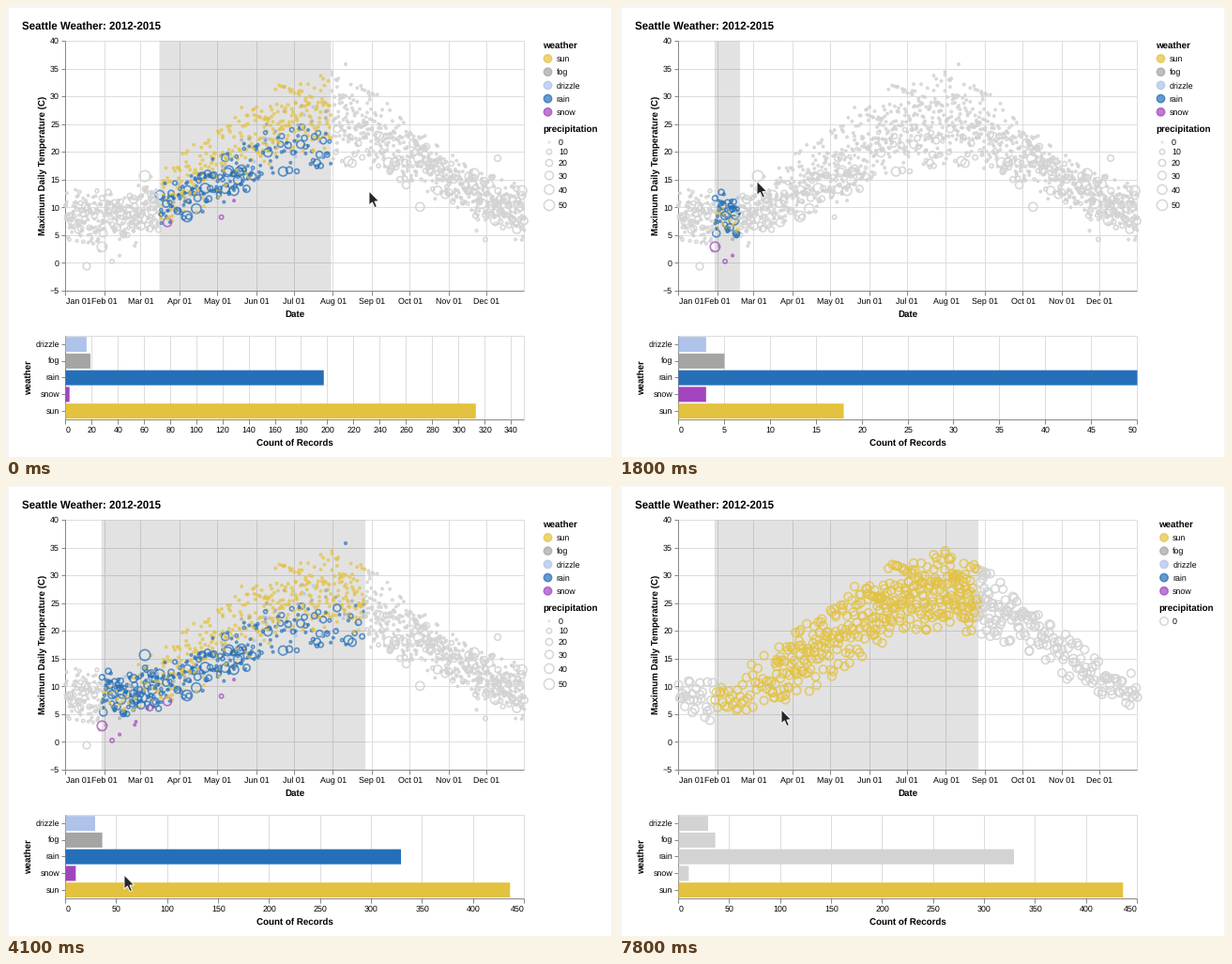
These frames come from a looping animation (647 by 480 pixels, 8000 ms). A matplotlib script:

```python
import math
import numpy as np
import matplotlib.pyplot as plt
from matplotlib.animation import FuncAnimation
from matplotlib.colors import to_rgba
from matplotlib.patches import Circle, Polygon, Rectangle

W, H, DPI = 647, 480, 100
PT = 72 / DPI                       # points per pixel
LEFT, RIGHT = 63.5, 552.5
TOP, BOTTOM = 37.5, 303.5           # scatter plot
BAR_TOP, BAR_BOTTOM = 351.5, 440.5  # bar chart
DAY = (RIGHT - LEFT) / 365
SMALL, MEDIUM, LARGE = 8.87, 9.76, 11.53
GREY, GRID, AXIS = "#d3d3d3", "#dddddd", "#888888"
STEP_MS, LOOP_MS = 100, 8000

plt.rcParams["font.family"] = "Liberation Sans"
plt.rcParams["text.hinting"] = "no_hinting"
fig = plt.figure(figsize=(W / DPI, H / DPI), dpi=DPI, facecolor="#f5f5f5")
ax = fig.add_axes([0, 0, 1, 1])
ax.set_xlim(0, W)
ax.set_ylim(H, 0)
ax.axis("off")


# ---------- weather records ----------

COLORS = dict(sun="#e3c240", fog="#a5a5a4", drizzle="#aec2ea",
              rain="#256fb8", snow="#a244be")
KINDS = list(COLORS)

# mean temperature, seasonal swing, warmest day, spread, autumn skew
CLIMATE = dict(sun=(17.5, 9.8, 207, 6, 1.5), fog=(16, 8, 209, 5.5, 1),
               drizzle=(16, 8, 209, 5.5, 1), rain=(15, 6.5, 212, 4.8, 0.75),
               snow=(10.5, 6.5, 212, 4.5, 0.3))

# records of each kind between these days of the year
PERIODS = [0, 29, 75, 155, 212, 239, 366]
COUNTS = dict(sun=[30, 42, 162, 151, 81, 174], fog=[20, 12, 7, 12, 5, 45],
              drizzle=[8, 7, 4, 12, 6, 16], rain=[48, 115, 143, 53, 14, 263],
              snow=[9, 7, 3, 0, 0, 6])

# storms that stand out: kind, x, y, radius
STORMS = [("rain", 148, 181, 5.7), ("rain", 193, 224, 5.5),
          ("rain", 365, 165, 4.7), ("rain", 362, 62, 1.2),
          ("rain", 524, 162, 3.3), ("snow", 86, 277, 3.8)]


def temp_y(temp):
    return BOTTOM - (temp + 5) * (BOTTOM - TOP) / 45


def radius(rainfall):
    return 5.6 * np.sqrt((rainfall + 2) / 52)


def season(days, warmest):
    return np.cos(2 * np.pi * (days - warmest) / 365)


def make_records():
    rng = np.random.default_rng(12)
    rows = [(x, y, r, KINDS.index(kind)) for kind, x, y, r in STORMS]
    for k, kind in enumerate(KINDS):
        mean, swing, warmest, spread, skew = CLIMATE[kind]
        for start, end, n in zip(PERIODS, PERIODS[1:], COUNTS[kind]):
            u = (np.arange(n) + rng.random(n)) / max(n, 1)
            if end == 366:
                u **= skew
            days = np.floor(start + (end - start) * u)
            width = spread * (1 + 0.37 * season(days, 170) * (kind == "sun"))
            temp = (mean + swing * season(days, warmest)
                    + width * (2 * rng.beta(2, 2, n) - 1))
            wet = 45 * rng.random(n) ** 6 * (kind in ("rain", "snow"))
            rows += zip(LEFT + days * DAY, temp_y(temp), radius(wet), [k] * n)
    return rng.permutation(np.array(rows, float))


PX, PY, PR, PK = make_records().T
PK = PK.astype(int)
POINT_RGBA = np.array([to_rgba(COLORS[k], 0.72) for k in KINDS])[PK]
GREY_RGBA = to_rgba(GREY, 0.88)


# ---------- motion ----------

# pointer moves: start ms, end ms, destination x, y
MOVES = [(400, 1200, 147, 177), (1500, 1700, 102, 185), (1700, 2900, 384, 194),
         (3200, 3500, 430, 229), (3600, 4100, 126, 415), (4100, 4500, 117, 430),
         (4600, 4800, 107, 391), (5300, 5500, 107, 456), (5600, 6000, 107, 417),
         (6300, 6500, 96, 432), (7200, 7800, 173, 239)]


def pointer(t):
    pos = np.array([387.0, 197.0])
    for start, end, x, y in MOVES:
        p = min(max((t - start) / (end - start), 0), 1)
        pos += (np.array([x, y]) - pos) * (1 - (1 - p) ** 2)
    return pos


def brush(t):
    """Selected x range, or None while nothing is selected."""
    if t < 1000:
        return 163.5, 346.4 if t < 400 else 387
    if t < 1800:
        return None
    trail = 18 if t < 3100 else 1
    return 101.8, pointer(min(t, 3100))[0] - trail


# ---------- drawing helpers ----------

def text(x, y, s, size=SMALL, ha="left", bold=False, rotation=0):
    if not rotation:
        y += 0.35 * size
    return ax.text(x, y, s, fontsize=size * PT, ha=ha, va="baseline",
                   rotation=rotation, rotation_mode="anchor",
                   weight="bold" if bold else "normal", color="black", zorder=6)


def line(x0, y0, x1, y1, color=GRID, z=1):
    xs, ys = np.floor([x0, x1]) + 0.5, np.floor([y0, y1]) + 0.5
    return ax.plot(xs, ys, color=color, lw=PT, zorder=z, snap=False,
                   solid_capstyle="butt")[0]


def box(x, y, w, h, color, z, alpha=1):
    return ax.add_patch(Rectangle((x, y), w, h, fc=color, ec="none",
                                  alpha=alpha, zorder=z, snap=False))


def ring(x, y, r, edge, face="none", lw=1.5):
    return ax.add_patch(Circle((x, y), r, fc=face, ec=edge, lw=lw * PT, zorder=6))


def tick_step(span, count):
    raw = span / count
    power = 10 ** math.floor(math.log10(raw))
    e = raw / power
    for limit, factor in ((50, 10), (10, 5), (2, 2)):
        if e >= math.sqrt(limit):
            return power * factor
    return power


def nice_top(most):
    """Round up to whole ticks until the tick step settles."""
    top, last = most, None
    while last != (step := tick_step(top, 10)):
        top, last = math.ceil(top / step) * step, step
    return top


def draw_static():
    box(3, 2, 642, H - 2, "white", 0)
    text(17, 21, "Seattle Weather: 2012-2015", LARGE, bold=True)
    for temp in range(-5, 41, 5):
        y = temp_y(temp)
        line(LEFT, y, RIGHT, y)
        line(LEFT - 4.5, y, LEFT, y, AXIS, 2.5)
        text(57, y - 0.5, str(temp).replace("-", "\u2212"), ha="right")
    months = "Jan Feb Mar Apr May Jun Jul Aug Sep Oct Nov Dec".split()
    starts = np.cumsum([0, 31, 29, 31, 30, 31, 30, 31, 31, 30, 31, 30])
    for name, day in zip(months, starts):
        x = LEFT + day * DAY
        line(x, TOP, x, BOTTOM)
        line(x, BOTTOM, x, BOTTOM + 4.5, AXIS, 2.5)
        text(x, 314, name + " 01", ha="center" if day else "left")
    line(RIGHT, TOP, RIGHT, BOTTOM)
    line(RIGHT, BAR_TOP, RIGHT, BAR_BOTTOM)
    line(LEFT, BAR_TOP, RIGHT, BAR_TOP)
    for top, bottom in ((TOP, BOTTOM), (BAR_TOP, BAR_BOTTOM)):
        line(LEFT, top, LEFT, bottom, AXIS, 2.5)
        line(LEFT, bottom, RIGHT, bottom, AXIS, 2.5)
    text(42, 170, "Maximum Daily Temperature (C)", MEDIUM, "center", True, 90)
    text(27, 395.5, "weather", MEDIUM, "center", True, 90)
    text(308, 327, "Date", MEDIUM, "center", True)
    text(308, 464, "Count of Records", MEDIUM, "center", True)


def draw_points(span, sun_only):
    shown = PK == 0 if sun_only else np.ones(len(PK), bool)
    colors = POINT_RGBA.copy()
    if span:
        colors[(PX < span[0]) | (PX > span[1])] = GREY_RGBA
    r = np.full(len(PR), 4.3) if sun_only else PR
    return [ax.scatter(PX[shown], PY[shown], s=(2 * r[shown] * PT) ** 2,
                       facecolors="none", edgecolors=colors[shown],
                       linewidths=1.7 * PT, zorder=3)]


def draw_bars(span, sun_only):
    inside = (PX >= span[0]) & (PX <= span[1]) if span else np.ones(len(PX), bool)
    counts = np.bincount(PK[inside], minlength=len(KINDS))
    top = nice_top(max(counts.max(), 5))
    scale = (RIGHT - LEFT) / top
    out = []
    for v in np.arange(0, top + 1e-6, tick_step(top, 13)):
        x = LEFT + v * scale
        ha = "left" if v == 0 else "right" if abs(v - top) < 1e-6 else "center"
        out += [line(x, BAR_TOP, x, BAR_BOTTOM),
                line(x, BAR_BOTTOM, x, BAR_BOTTOM + 4.5, AXIS, 2.5),
                text(x, 451, f"{v:g}", ha=ha)]
    for i, kind in enumerate(sorted(KINDS)):
        y = BAR_TOP + 17.74 * (i + 0.5)
        color = GREY if sun_only and kind != "sun" else COLORS[kind]
        width = counts[KINDS.index(kind)] * scale
        out += [box(LEFT, y - 8.2, width, 16, color, 3),
                line(LEFT - 4.5, y, LEFT, y, AXIS, 2.5),
                text(57, y - 0.6, kind, ha="right")]
    return out


def draw_legend(sun_only):
    dx = 3.5 if sun_only else 0
    out = [text(572 + dx, 41, "weather", MEDIUM, bold=True),
           text(572 + dx, 131, "precipitation", MEDIUM, bold=True)]
    for i, kind in enumerate(KINDS):
        y = 56 + 14.2 * i
        c = to_rgba(COLORS[kind], 0.7)
        out += [ring(577.5 + dx, y, 4.2, c, c), text(586.7 + dx, y, kind)]
    if sun_only:
        return out + [ring(581, 145, 4.3, "#d6d6d6"), text(590, 145, "0")]
    y = 145
    for v in range(0, 51, 10):
        out += [ring(579, y, radius(v), "#d6d6d6", lw=1.5 if v else 0.8),
                text(589, y, str(v))]
        y += 10.2 + 0.16 * v
    return out


ARROW = np.array([(0, 0), (0, 15), (3.4, 11.9), (6, 17.6), (8.4, 16.5),
                  (5.9, 11), (10.6, 10.8)])


def draw_pointer(t):
    return [ax.add_patch(Polygon(ARROW + pointer(t), closed=True, fc="#262626",
                                 ec="white", lw=0.9 * PT, zorder=10))]


live = []


def update(frame):
    t = frame * STEP_MS
    for artist in live:
        artist.remove()
    live.clear()
    span, sun_only = brush(t), t >= 6800
    if span:
        live.append(box(span[0], TOP, span[1] - span[0], BOTTOM - TOP,
                        "#333333", 2, 0.14))
    live.extend(draw_points(span, sun_only) + draw_bars(span, sun_only)
                + draw_legend(sun_only) + draw_pointer(t))
    return live


draw_static()
anim = FuncAnimation(fig, update, frames=LOOP_MS // STEP_MS, interval=STEP_MS,
                     repeat=True, repeat_delay=0, blit=False)
plt.show()
```
